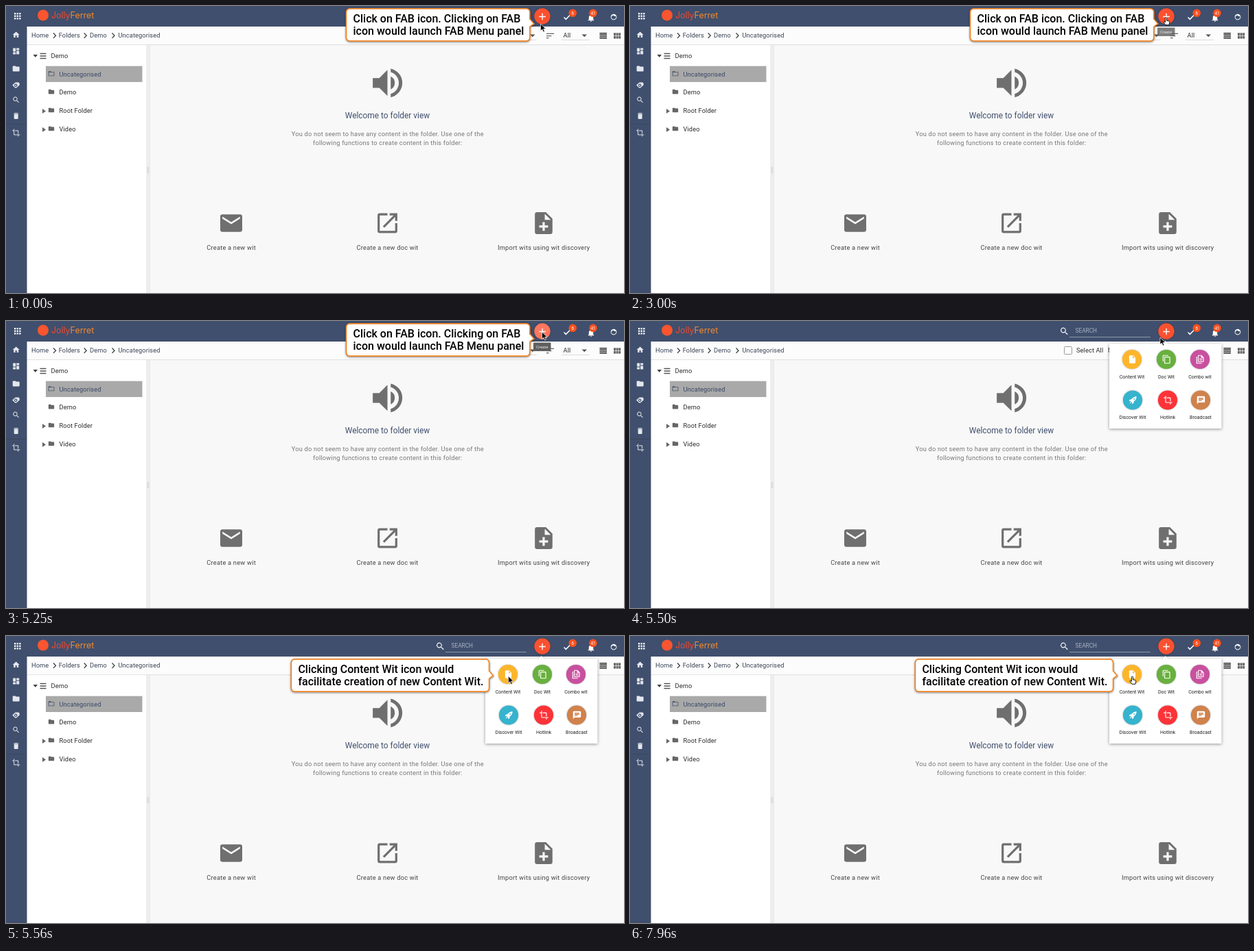
Write an HTML page that moves like this. It is 900 px wide and 419 px high and loops after 8 s.

```html
<!DOCTYPE html>
<html lang="en">
<head>
<meta charset="utf-8">
<title>Create menu walkthrough</title>
<style>
  html, body { margin: 0; height: 100%; overflow: hidden; }
  svg { display: block; width: 900px; height: 419px; }
  text { font-family: Roboto, Arial, sans-serif; white-space: pre; }
  .callout rect, .callout path { fill: #fff; stroke: #ef8427; stroke-width: 1.7; }
  .callout .cover { stroke: none; }
  .callout { filter: drop-shadow(0 1px 1.5px #0007); }
  .fab { filter: drop-shadow(0 .5px .8px #0005); }
  #panel { filter: drop-shadow(0 1px 2px #0006); }
</style>
</head>
<body>
<svg id="stage" viewBox="0 0 900 419"></svg>
<script>
const NAVY = '#404f6d', GREY = '#6f6f6f', PALE = '#e3e7ee', RED = '#fb5130';

// Icon outlines on a 24-unit grid
const P = {
  home: 'M10 20v-6h4v6h5v-8h3L12 3 2 12h3v8z',
  board: 'M3 13h8V3H3zm0 8h8v-6H3zm10 0h8V11h-8zm0-18v6h8V3z',
  folder: 'M10 4H4Q2 4 2 6V18Q2 20 4 20H20Q22 20 22 18V8Q22 6 20 6H12z',
  open: 'M20 6h-8l-2-2H4Q2 4 2 6V18Q2 20 4 20H20Q22 20 22 18V8Q22 6 20 6zm0 12H4V8h16z',
  search: 'M15.5 14h-.8l-.3-.3A6.5 6.5 0 1 0 13.7 14.4l.3.3v.8l5 5 1.5-1.5zm-6 0a4.5 4.5 0 1 1 0-9 4.5 4.5 0 0 1 0 9z',
  bin: 'M6 19q0 2 2 2h8q2 0 2-2V7H6zM19 4h-3.5l-1-1h-5l-1 1H5v2h14z',
  crop: 'M17 15h2V7q0-2-2-2H9v2h8zM7 17V1H5v4H1v2h4v10q0 2 2 2h10v4h2v-4h4v-2z',
  mail: 'M20 4H4Q2 4 2 6V18Q2 20 4 20H20Q22 20 22 18V6Q22 4 20 4zm0 4l-8 5-8-5V6l8 5 8-5z',
  launch: 'M19 19H5V5h7V3H5Q3 3 3 5v14q0 2 2 2h14q2 0 2-2v-7h-2zM14 3v2h3.6l-9.8 9.8 1.4 1.4L19 6.4V10h2V3z',
  add: 'M14 2H6Q4 2 4 4V20Q4 22 6 22H18Q20 22 20 20V8zm2 14h-3v3h-2v-3H8v-2h3v-3h2v3h3zm-3-7V3.5L18.5 9z',
  file: 'M14 2H6Q4 2 4 4V20Q4 22 6 22H18Q20 22 20 20V8zm-1 7V3.5L18.5 9z',
  sound: 'M3 9v6h4l5 5V4L7 9zm13.5 3A4.5 4.5 0 0 0 14 8v8a4.5 4.5 0 0 0 2.5-4zM14 3.2v2.1a7 7 0 0 1 0 13.4v2.1a9 9 0 0 0 0-17.6z',
  bell: 'M12 22q2 0 2-2h-4q0 2 2 2zm6-6v-5c0-3-1.6-5.6-4.5-6.3V4a1.5 1.5 0 0 0-3 0v.7C7.6 5.4 6 8 6 11v5l-2 2v1h16v-1z',
  check: 'M9 15.2L4.8 11 2.8 13 9 19.2 21.2 7 19.2 5z',
  copy: 'M16 1H4Q2 1 2 3v14h2V3h12zm3 4H8Q6 5 6 7v14q0 2 2 2h11q2 0 2-2V7q0-2-2-2zm0 16H8V7h11z',
  combo: 'M2 5V22q0 1 1 1H16v-2H4V5zM15 1H8Q6 1 6 3V17q0 2 2 2H19q2 0 2-2V7zm4 16H8V3h6v5h5zM10 10h7v1.5h-7zm0 3.5h7V15h-7z',
  chat: 'M20 2H4Q2 2 2 4V22l4-4h14q2 0 2-2V4Q22 2 20 2zM6 9h12v2H6zm8 5H6v-2h8zm4-6H6V6h12z',
  face: 'M12 2a10 10 0 1 0 0 20 10 10 0 0 0 0-20zm0 18a8 8 0 0 1-8-8.9q3.6-1.6 5.2-5.3 3.8 5 10.5 4a8 8 0 0 1-7.7 10.2z',
  sort: 'M3 18h6v-2H3zM3 6v2h18V6zm0 7h12v-2H3z',
  rocket: 'M21 3C15 3 11 6 8 10L4 10.5 2 14l4 .5 3.5 3.5.5 4 3.5-2 .5-4C18 13 21 9 21 3zM15 7.5a1.7 1.7 0 1 1 0 3.4 1.7 1.7 0 0 1 0-3.4zM6 16l-3 5 5-3z',
  tag: 'M1 12L10 4H18Q22 4 22 8V12L13 20H9zM11 8a4.5 4.5 0 1 0 .1 0zM11 10.5a2 2 0 1 1-.1 0z'
};

const icon = (name, x, y, size, fill) =>
  `<path d="${P[name]}" fill="${fill}" fill-rule="evenodd" transform="translate(${x - size / 2} ${y - size / 2}) scale(${size / 24})"/>`;
const text = (s, x, y, size, fill, more = '') =>
  `<text x="${x}" y="${y}" font-size="${size}" fill="${fill}" ${more}>${s}</text>`;
const mid = (s, x, y, size, fill, more = '') => text(s, x, y, size, fill, 'text-anchor="middle" ' + more);
const box = (x, y, w, h, fill, more = '') =>
  `<rect x="${x}" y="${y}" width="${w}" height="${h}" fill="${fill}" ${more}/>`;
const dot = (x, y, r, fill, more = '') => `<circle cx="${x}" cy="${y}" r="${r}" fill="${fill}" ${more}/>`;
const line = (d, stroke, width = 1) => `<path d="${d}" fill="none" stroke="${stroke}" stroke-width="${width}"/>`;
const shape = (d, fill) => `<path d="${d}" fill="${fill}"/>`;
const label = (s, x, y, fill = '#2a2a2a') => text(s, x, y, 9.25, fill, 'letter-spacing=".1"');
const badge = (s, x) => dot(x, 10.3, 5.8, '#f9501f') + mid(s, x, 12.6, 6.4, '#fff');

function header() {
  let s = box(0, 0, 900, 30, NAVY);
  for (let i = 0; i < 9; i++) s += box(12 + i % 3 * 3.6, 10 + (i / 3 | 0) * 3.6, 2.3, 2.3, '#fff');
  return s + dot(54, 13.5, 8, '#f9552f') +
    `<text x="66" y="18" font-size="12.4" style="font-family:Inter,sans-serif" fill="#ee4a31">Jolly<tspan fill="#f58a2c">Ferret</tspan></text>` +
    icon('search', 632.5, 15, 14.5, '#fff') + text('SEARCH', 648.5, 17.2, 8.3, '#aab3c3') +
    line('M640 23.5H758', '#8c97ab') +
    dot(781, 15, 11.7, RED, 'class="fab"') + dot(781, 15, 11.7, '#fff', 'id="ripple"') +
    line('M776.3 15.5h9.6M781.1 10.7v9.6', '#fff', 1.4) +
    icon('check', 817, 16.5, 13, '#fff') + badge('6', 825.3) +
    icon('bell', 852, 17.5, 13, '#fff') + badge('41', 855) +
    icon('face', 885, 16, 10.5, '#fff');
}

function sidebar() {
  const items = [['home', 42], ['board', 66], ['folder', 91.5], ['tag', 115.5], ['search', 137], ['bin', 160.5], ['crop', 185]];
  return box(0, 30, 30.5, 389, NAVY) + line('M0 172.5H30', '#39475f') +
    items.map(([n, y]) => icon(n, 14.7, y, 12, PALE)).join('');
}

function toolbar() {
  let s = box(30.5, 30, 870, 26.5, '#fcfcfc') + line('M30 56.7H900', '#dcdcdc');
  [['Home', 37], ['Folders', 76.7], ['Demo', 122], ['Uncategorised', 163.5]].forEach(([n, x]) => s += label(n, x, 46.3, '#3b4456'));
  [69, 113.7, 154.5].forEach(x => s += line(`M${x} 39.5l3.5 3.7-3.5 3.7`, '#333', 1.2));
  s += box(632.5, 37.5, 11, 11, '#fff', 'stroke="#999" rx="1"') + label('Select All', 650, 46.3) + label('Name', 696, 46.3);
  s += line('M696 49.5H773M809 49.5H850', '#d5d5d5', .8);
  s += shape('M763 41.5h7.5l-3.7 3.8zM838.5 41.5h7.5l-3.7 3.8z', '#555');
  s += icon('sort', 792.5, 43.5, 15, '#666') + label('All', 811.5, 46);
  for (let i = 0; i < 4; i++) s += box(864.5, 39 + i * 2.4, 10.5, 1.5, '#333');
  for (let i = 0; i < 6; i++) s += box(885 + i % 3 * 3.6, 39.3 + (i / 3 | 0) * 4.5, 3, 3.8, '#666');
  return s;
}

function tree() {
  let s = box(30.5, 57, 175, 362, '#fff') + box(205, 57, 4.5, 362, '#efefef') +
    line('M205 57V419M209.3 57V419', '#dedede', .7) + line('M206.3 235v9M207.8 235v9', '#c4c4c4', .6);
  s += shape('M39.5 71h6.6l-3.3 4z', '#444') + line('M49.5 69.5h9M49.5 73h9M49.5 76.5h9', '#555', 1.3) + label('Demo', 65.5, 75.7);
  s += box(58, 87.7, 140.5, 23.3, '#a9a9a9') + icon('open', 66, 98.8, 10.5, '#4a5365') + label('Uncategorised', 77.5, 102.8, '#394866');
  [['Demo', 125.7], ['Root Folder', 152.5], ['Video', 179.5]].forEach(([n, y], i) => {
    s += icon('folder', 66, y - .5, 10, '#666') + label(n, 77.5, y + 3.6);
    if (i) s += shape(`M53 ${y - 2.5}v7l5-3.5z`, '#666');
  });
  return s;
}

function content() {
  const cards = [['mail', 'Create a new wit', 328], ['launch', 'Create a new doc wit', 555.5], ['add', 'Import wits using wit discovery', 783]];
  const more = 'letter-spacing=".22"';
  return box(209.5, 57, 691, 362, '#f8f8f8') + icon('sound', 555.5, 112.3, 57, GREY) +
    mid('Welcome to folder view', 555.5, 163.7, 11.9, NAVY) +
    mid('You do not seem to have any content in the folder. Use one of the', 555.8, 189.5, 9.23, '#777', more) +
    mid('following functions to create content in this folder:', 555.8, 203.3, 9.23, '#777', more) +
    cards.map(([n, s, x]) => icon(n, x, 317, 38.4, GREY) + mid(s, x + .1, 355.8, 9.25, '#444', more)).join('');
}

function panel() {
  const items = [
    ['file', 'Content Wit', 731, '#fdb62b'], ['copy', 'Doc Wit', 781, '#68b03e'], ['combo', 'Combo wit', 830, '#c8509f'],
    ['rocket', 'Discover Wit', 732, '#36b3cd'], ['crop', 'Hotlink', 783, '#fd3338'], ['chat', 'Broadcast', 831, '#d0824c']];
  return `<g id="panel">${box(698, 33, 163.5, 124, '#fff')}${shape('M775 33.5l4.5-4.5 4.5 4.5z', '#fff')}</g>` +
    items.map(([n, s, x, c], i) => {
      const y = i < 3 ? 56 : 115.5;
      return dot(x, y, 14.1, c, 'class="fab"') + icon(n, x + .5, y, 13.8, '#fff') + mid(s, x, y + 27.7, 7, '#222');
    }).join('');
}

// Speech box whose tail leaves the right edge at height ty
const callout = (id, x, y, w, h, ty, rows) =>
  `<g id="${id}"><g class="callout"><rect x="${x}" y="${y}" width="${w}" height="${h}" rx="5"/>` +
  `<path d="M${x + w} ${ty - 6}l6 7-6 4"/><rect class="cover" x="${x + w - 2}" y="${ty - 5}" width="2.5" height="9.5"/></g>` +
  rows.map((r, i) => text(r, x + 10, y + 19.6 + i * 18.7, 16, '#000', 'font-weight="500"')).join('') + '</g>';

document.getElementById('stage').innerHTML = content() + toolbar() + tree() + header() + sidebar() +
  `<g id="tip">${box(768, 31.5, 25.5, 12.5, '#5f5f5f', 'rx="1"')}${mid('Create', 780.7, 40, 5.9, '#eee')}</g>` +
  `<g id="menu">${panel()}</g>` +
  callout('first', 495.5, 3.9, 267.4, 47.2, 25, ['Click on FAB icon. Clicking on FAB', 'icon would launch FAB Menu panel']) +
  callout('second', 415.4, 33.9, 288.2, 47.2, 57, ['Clicking Content Wit icon would', 'facilitate creation of new Content Wit.']) +
  `<g id="cursor" stroke-linejoin="round"><path id="arrow" d="M0 0v10.3l2.4-2.2 1.7 3.9 1.8-.8-1.7-3.8h3.3z" fill="#000" stroke="#fff" stroke-width=".7"/>` +
  `<path id="hand" d="M-1 1.6a1 1 0 0 1 2 0v3.6l3.3.8q1.2.4 1 1.7l-.8 4h-5l-3.2-4.2q.3-1.2 1.5-.6l1.2 1z" fill="#fff" stroke="#000" stroke-width=".9"/></g>`;

const el = id => document.getElementById(id);
const alpha = (id, a) => el(id).setAttribute('opacity', +a);

function draw(now) {
  const t = now % 8000, opened = t >= 5500;
  const hand = t >= 2750 && t < 4750 || t >= 5960;
  let x = 780.5, y = 16;
  if (t < 250) { x = 778.5; y = 26; }
  if (opened) {
    const step = Math.min(3, Math.floor((t - 5500) / 20));
    x = 772 - 13.5 * step;
    y = 24 + 11.5 * step;
  }
  el('cursor').setAttribute('transform', `translate(${x} ${y})`);
  alpha('arrow', !hand);
  alpha('hand', hand);
  alpha('first', !opened);
  alpha('menu', opened);
  alpha('second', t >= 5560);
  alpha('tip', t < 3000 || opened ? 0 : t < 3250 ? .8 : 1);
  alpha('ripple', t < 5000 || opened ? 0 : t < 5250 ? .12 : .22);
  requestAnimationFrame(draw);
}
requestAnimationFrame(draw);
</script>
</body>
</html>
```
